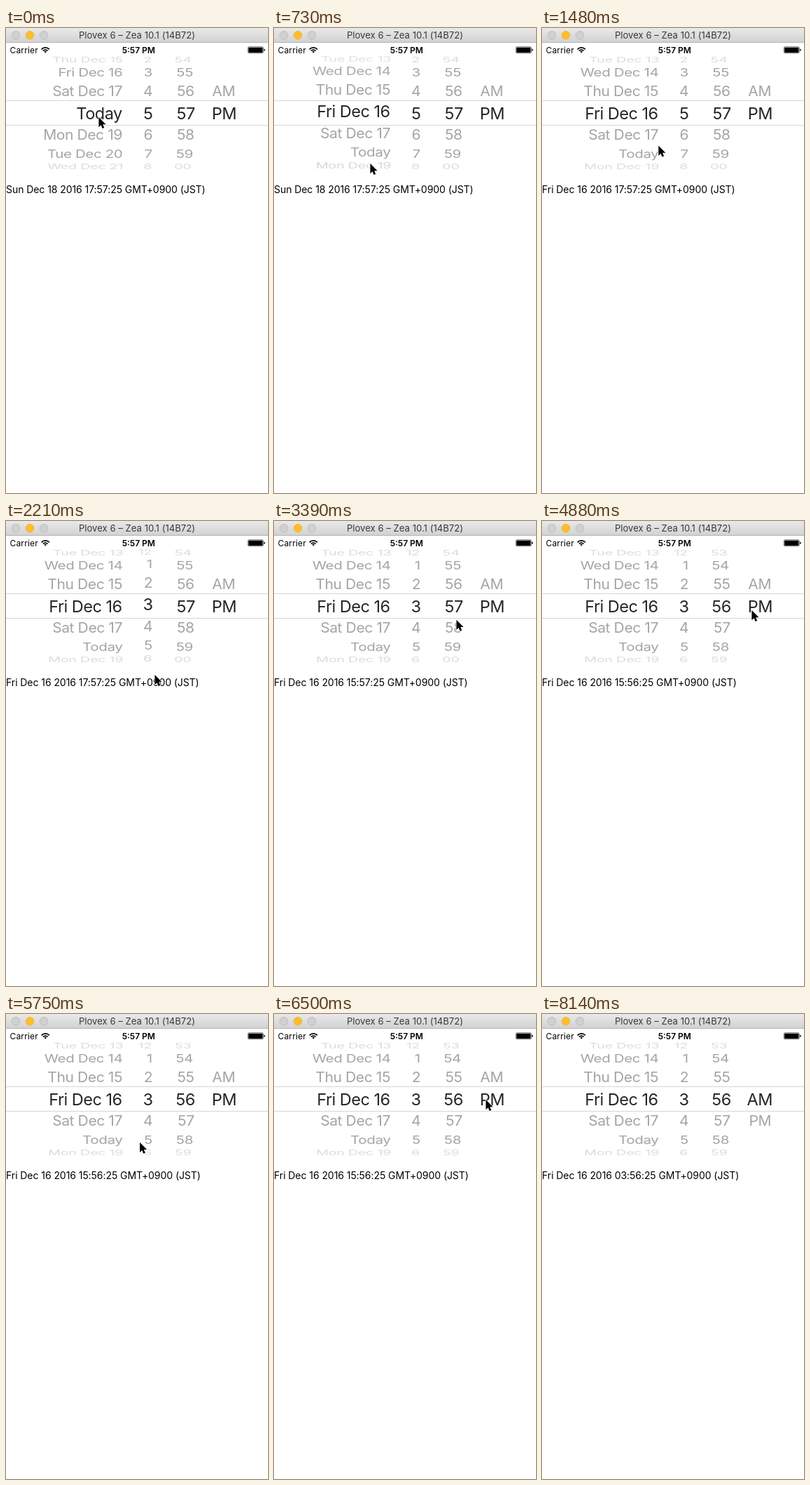
Recreate the animation shown at these times as an HTML page. Size 374 px wide and 662 px high, loop 8290 ms.

```html
<!DOCTYPE html>
<html lang="en">
<head>
<meta charset="utf-8">
<title>Date picker</title>
<style>
  html, body { margin: 0; width: 100%; height: 100%; overflow: hidden; background: #fff; }
  svg { display: block; }
  text { font-family: Inter, Roboto, "Liberation Sans", sans-serif; font-optical-sizing: none; white-space: pre; }
  .title { font-size: 13px; letter-spacing: .06px; fill: #383838; text-anchor: middle; }
  .carrier { font-size: 12px; letter-spacing: .15px; }
  .clock { font-size: 12px; font-weight: 600; text-anchor: middle; }
  .row { font-size: 21px; letter-spacing: -.4px; fill: #a4a4a4; text-anchor: end; }
  .picked { font-size: 23.5px; letter-spacing: -.5px; fill: #262626; text-anchor: end; }
  #output { font-size: 14px; letter-spacing: -.065px; }
</style>
</head>
<body>
<svg width="374" height="662" viewBox="0 0 374 662">
  <defs>
    <linearGradient id="bar" x2="0" y2="1">
      <stop stop-color="#e9e9e9"/><stop offset="1" stop-color="#d1d1d1"/>
    </linearGradient>
    <clipPath id="window"><rect y="104" width="374" height="34"/></clipPath>
    <clipPath id="drum"><rect y="38" width="374" height="168"/></clipPath>
  </defs>
  <rect width="374" height="662" fill="#fff"/>

  <rect width="374" height="21" fill="url(#bar)"/>
  <rect y="20" width="374" height="1" fill="#b4b4b4"/>
  <g stroke-width=".8">
    <circle cx="14" cy="10.3" r="5.8" fill="#d0d0d0" stroke="#b8b8b8"/>
    <circle cx="34" cy="10.3" r="5.8" fill="#fdbd2d" stroke="#f0b02c"/>
    <circle cx="54" cy="10.3" r="5.8" fill="#d0d0d0" stroke="#b8b8b8"/>
  </g>
  <text class="title" x="187" y="15">Plovex 6 – Zea 10.1 (14B72)</text>

  <text class="carrier" x="5.5" y="35.6">Carrier</text>
  <g transform="translate(56.2 35.6)" fill="none" stroke="#000" stroke-width="1.7">
    <path d="M-5.6-5.3A7.7 7.7 0 0 1 5.6-5.3M-3.4-3.1A4.8 4.8 0 0 1 3.4-3.1"/>
    <path d="M0 0L-1.8-1.8A2.5 2.5 0 0 1 1.8-1.8Z" fill="#000" stroke="none"/>
  </g>
  <text class="clock" x="189.3" y="35.6">5:57 PM</text>
  <rect x="345.3" y="26.8" width="22" height="9" rx="1.8" fill="none" stroke="#000" stroke-width=".6"/>
  <rect x="346.2" y="27.7" width="20.2" height="7.2" rx=".8"/>
  <path d="M368.2 29.6q1.5.4 1.5 1.7t-1.5 1.7z"/>

  <g id="drumRows" clip-path="url(#drum)"></g>
  <rect y="103" width="374" height="36" fill="#fff"/>
  <g id="lens" clip-path="url(#window)"></g>
  <path d="M0 103.5H374M0 138.5H374" stroke="#d6d6d6"/>
  <text id="output" x="0" y="235"></text>
  <path id="cursor" d="M.4 0V14.2L3.6 11.2 5.6 16 8.2 14.9 6.2 10.3H10.5Z"
        stroke="#fff" stroke-width="1.6" stroke-linejoin="round" paint-order="stroke"/>
</svg>
<script>
const LOOP = 8290, TICK = 148, LAST = 55;
const MID = 121, RADIUS = 95.5, STEP = 19 * Math.PI / 180, PITCH = 33, VANISH = 187;
const el = id => document.getElementById(id);
const mod = (n, m) => ((n % m) + m) % m;
const clamp = n => Math.max(0, Math.min(1, n));
const mix = (a, b, p) => a + (b - a) * p;
const easeOut = p => p * (2 - p);
const pad = n => String(n).padStart(2, '0');
const DAYS = ['Sun', 'Mon', 'Tue', 'Wed', 'Thu', 'Fri', 'Sat'];
const dayName = i => `${DAYS[mod(i, 7)]} Dec ${18 + i}`;

// right: edge of the text in the selected row
const wheels = {
  day: { first: 0, right: 165.7, label: i => i ? dayName(i) : 'Today' },
  hour: { first: 5, right: 209.5, label: i => mod(i - 1, 12) + 1 },
  minute: { first: 57, right: 269.8, label: i => pad(mod(i, 60)) },
  half: { first: 1, right: 329, label: i => ['AM', 'PM'][i] }
};

// Pointer moves between two ticks; one with a wheel drags it by some rows.
const home = { x: 132, y: 127 };
const moves = [
  { from: 1, to: 5, x: 137, y: 193, wheel: 'day', rows: -2, settle: 3 },
  { from: 9, to: 12, x: 189, y: 147 },
  { from: 13, to: 15, x: 212, y: 219, wheel: 'hour', rows: -2, settle: 3 },
  { from: 20, to: 23, x: 266, y: 131 },
  { from: 25, to: 28, x: 266, y: 167, wheel: 'minute', rows: -1, settle: 2 },
  { from: 30, to: 33, x: 299, y: 127 },
  { from: 33, to: 36, x: 104, y: 230 },
  { from: 36, to: 44, x: 302, y: 122 },
  { from: 44, to: 46, x: 299, y: 153, wheel: 'half', rows: -1, settle: 0 },
  { from: 50, to: 55, x: 336, y: 675 }
];

function pose(k) {
  const pointer = { ...home }, turn = {}, value = {};
  for (const name in wheels) turn[name] = value[name] = wheels[name].first;
  for (const m of moves) {
    const p = clamp((k - m.from) / (m.to - m.from));
    const q = m.wheel ? p : easeOut(p);
    pointer.x = mix(pointer.x, m.x, q);
    pointer.y = mix(pointer.y, m.y, q);
    if (!m.wheel) continue;
    // a released wheel snaps over the last bit, then reports its value
    const snap = m.settle ? clamp((k - m.to) / m.settle) : p;
    turn[m.wheel] += m.rows * mix(p, snap, .04);
    if (k >= m.to + m.settle) value[m.wheel] += m.rows;
  }
  return { pointer, turn, value };
}

// y is the middle of the capital letters
function label(cls, text, x, y, sx = 1, sy = 1, alpha = 1) {
  return `<text class="${cls}" dy=".364em" opacity="${alpha}"
    transform="translate(${x} ${y}) scale(${sx} ${sy})">${text}</text>`;
}

function drumRow(wheel, text, d) {
  const c = Math.cos(d * STEP);
  const s = 1.0087 / (1 + .135 * (1 - c));
  const flat = mix(VANISH, wheel.right, .985);
  return label('row', text, mix(VANISH, flat, s), MID + RADIUS * s * Math.sin(d * STEP),
    s, s * c, clamp(1 - .62 * (Math.abs(d) - 2)));
}

function draw(k) {
  const { pointer, turn, value } = pose(k);
  let rows = '', lens = '';
  for (const name in wheels) {
    const wheel = wheels[name], v = turn[name];
    for (let i = Math.ceil(v - 4); i <= v + 4; i++) {
      const text = wheel.label(i), d = i - v;
      if (text === undefined) continue;
      rows += drumRow(wheel, text, d);
      if (Math.abs(d) < 1) lens += label('picked', text, wheel.right, MID + d * PITCH);
    }
  }
  el('drumRows').innerHTML = rows;
  el('lens').innerHTML = lens;
  el('output').textContent = `${dayName(value.day)} 2016 ` +
    `${pad(value.hour + 12 * value.half)}:${value.minute}:25 GMT+0900 (JST)`;
  el('cursor').setAttribute('transform', `translate(${pointer.x} ${pointer.y})`);
  el('cursor').style.display = k < LAST ? '' : 'none';
}

const start = performance.now();
let shown = -1;
function frame() {
  const t = (performance.now() - start) % LOOP;
  const k = Math.min(LAST, Math.floor(t / TICK + .08));
  if (k !== shown) draw(shown = k);
  requestAnimationFrame(frame);
}
frame();
</script>
</body>
</html>
```
